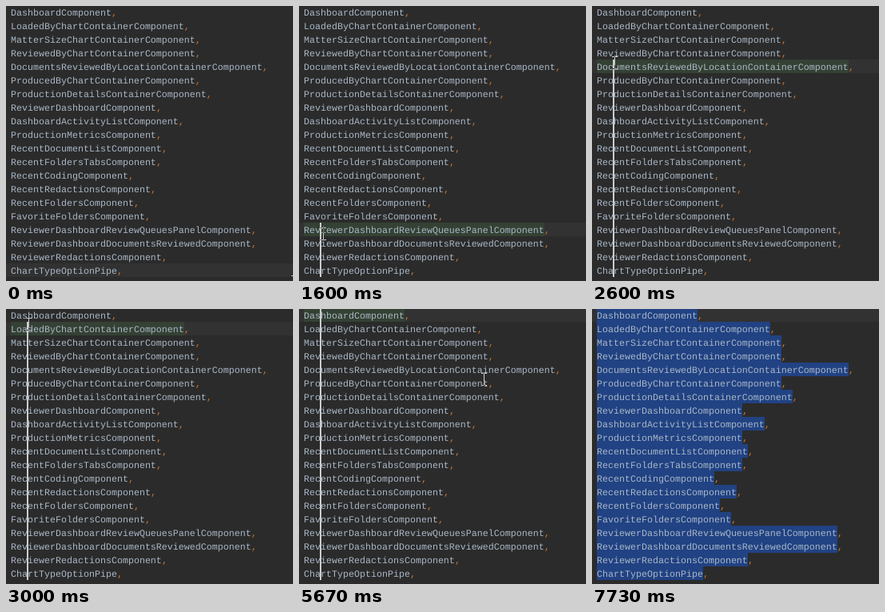
An HTML page that plays this animation: 359x344 px, repeating every 7790 ms.

```html
<!DOCTYPE html>
<html lang="en">
<head>
<meta charset="utf-8">
<title>Column selection in a code editor</title>
<style>
  html, body { margin: 0; width: 100%; height: 100%; overflow: hidden; background: #2b2b2b; }
  svg { display: block; width: 359px; height: 344px; isolation: isolate; }
  text { font: 11.667px "Liberation Mono", monospace; fill: #a9b7c6; text-rendering: geometricPrecision; }
  tspan { fill: #cc7832; }
  #mouse { fill: #fff; mix-blend-mode: difference; }
</style>
</head>
<body>
<svg id="stage" viewBox="0 0 359 344" shape-rendering="crispEdges">
  <rect width="359" height="344" fill="#2b2b2b"/>
  <rect id="line" width="359" height="17" fill="#323232"/>
  <rect id="ident" x="6" height="17" fill="#344134"/>
  <path id="selection" fill="#214283"/>
  <g id="code"></g>
  <path id="carets" fill="#ccc"/>
  <path id="mouse" d="M-3-8h3v1h-3zM1-8h3v1h-3zM0-7h1v14h-1zM-3 7h3v1h-3zM1 7h3v1h-3z"/>
</svg>
<script>
const LOOP = 7790, STEP = 200 / 3, BLINK = 535;
const LEFT = 6, CHAR = 7, ROW = 17;
const CLICK = 1130, DRAG = 1270, RELEASE = 3130, HOME = 5730, SELECT = 6270;
const names = `DashboardComponent LoadedByChartContainerComponent
  MatterSizeChartContainerComponent ReviewedByChartContainerComponent
  DocumentsReviewedByLocationContainerComponent ProducedByChartContainerComponent
  ProductionDetailsContainerComponent ReviewerDashboardComponent
  DashboardActivityListComponent ProductionMetricsComponent
  RecentDocumentListComponent RecentFoldersTabsComponent RecentCodingComponent
  RecentRedactionsComponent RecentFoldersComponent FavoriteFoldersComponent
  ReviewerDashboardReviewQueuesPanelComponent ReviewerDashboardDocumentsReviewedComponent
  ReviewerRedactionsComponent ChartTypeOptionPipe`.split(/\s+/);
const last = names.length - 1;

// Eased pointer moves; bow bends the path vertically
const origin = { x: 360, y: 345 };
const moves = [
  { from: 0, to: 800, x: 30, y: 326, bow: -25 },
  { from: 1150, to: 3140, x: 28, y: 15 },
  { from: 3533, to: 3733, x: 173, y: 59 },
  { from: 3867, to: 4200, x: 354, y: 90 },
  { from: 4200, to: 4533, x: 41, y: 28 },
  { from: 4533, to: 5133, x: 231, y: 88 },
  { from: 6867, to: 7200, x: 245, y: -20 }
];
// Input events that restart the caret blinking
const restarts = [3530, HOME + 5, 6395, 7135];

const byId = id => document.getElementById(id);
const rowTop = row => row * ROW - 1;
const endX = row => LEFT + names[row].length * CHAR;
const box = (x, y, w, h) => `M${x} ${y}h${w}v${h}h${-w}z`;
const ease = k => k * k * (3 - 2 * k);
const set = (id, attrs) => {
  for (const key in attrs) byId(id).setAttribute(key, attrs[key]);
};

byId("code").innerHTML = names.map((name, i) =>
  `<text x="${LEFT}" y="${i * ROW + 12}">${name}<tspan>,</tspan></text>`).join("");

function pointer(t) {
  let { x, y } = origin;
  for (const m of moves) {
    if (t <= m.from) break;
    const k = ease(Math.min(1, (t - m.from) / (m.to - m.from)));
    x += (m.x - x) * k;
    y += (m.y - y) * k + (m.bow || 0) * 4 * k * (1 - k);
  }
  return [Math.round(x), Math.round(y)];
}

function caretsOn(time) {
  if (time < restarts[0]) return time >= CLICK;
  const since = time - Math.max(...restarts.filter(r => r <= time));
  return Math.floor(since / BLINK) % 2 === 0;
}

function currentRow(time, y) {
  if (time < DRAG) return last;
  if (time >= RELEASE) return 0;
  return Math.max(0, Math.min(last, Math.floor((y + 1) / ROW)));
}

function draw(time) {
  // The screen refreshes fifteen times a second
  const [x, y] = pointer(Math.floor((time + 5) / STEP) * STEP);
  const row = currentRow(time, y);
  const selected = time >= SELECT;

  set("mouse", { transform: `translate(${x} ${y})` });
  set("line", { y: rowTop(row) });
  set("ident", {
    y: rowTop(row),
    width: time >= DRAG && !selected ? endX(row) - LEFT : 0
  });
  set("selection", {
    d: selected ? names.map((_, i) => box(LEFT, rowTop(i), endX(i) - LEFT, ROW)).join("") : ""
  });

  const columnX = LEFT + (time < HOME ? 3 : 0) * CHAR;
  let d = "";
  if (caretsOn(time)) for (let i = row; i <= last; i++) {
    d += box((selected ? endX(i) : columnX) - 1, rowTop(i), 2, ROW);
  }
  set("carets", { d });
}

const start = performance.now();
function tick() {
  draw((performance.now() - start) % LOOP);
  requestAnimationFrame(tick);
}
tick();
</script>
</body>
</html>
```
